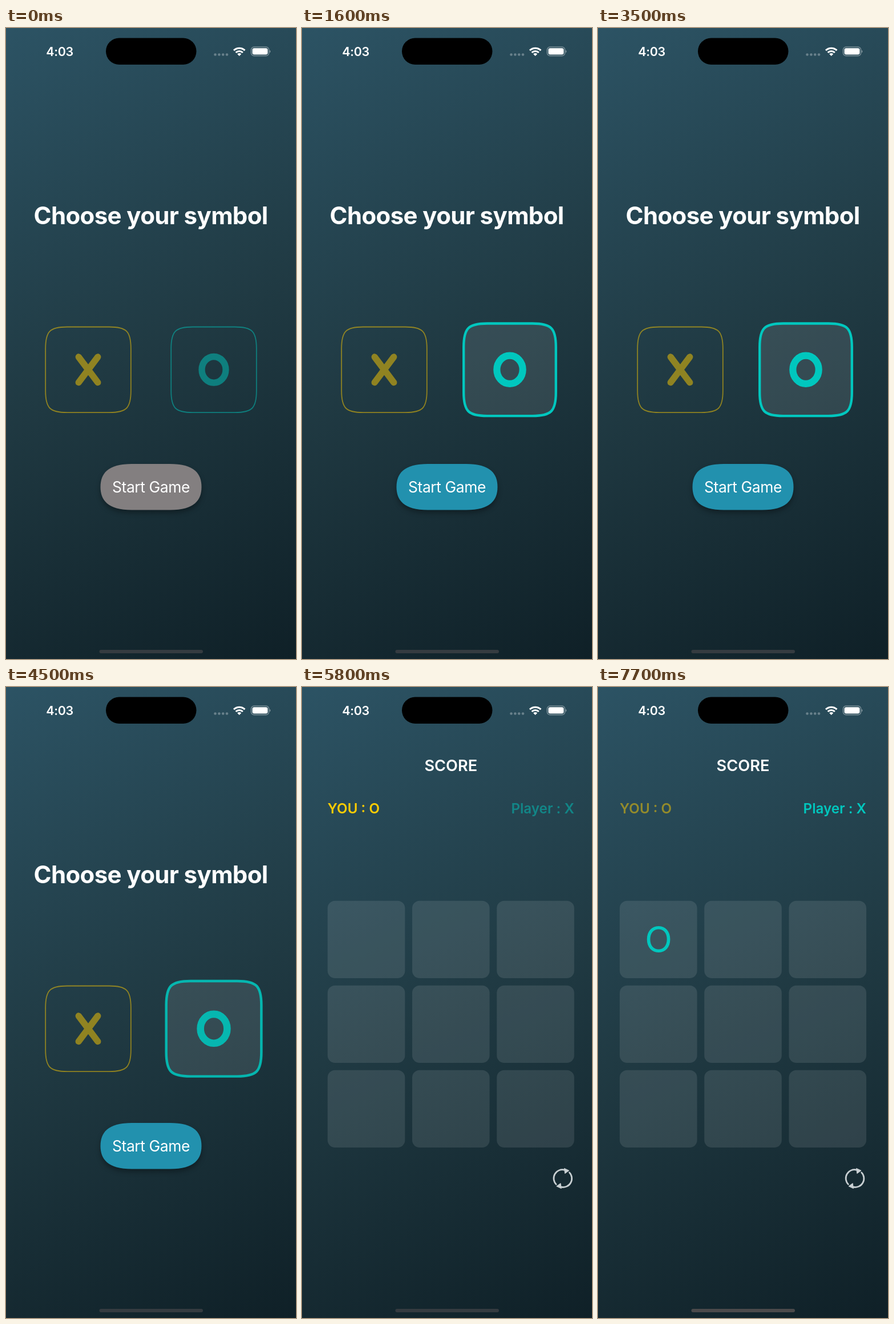
An HTML page that plays this animation: 508x1103 px, repeating every 8000 ms.

```html
<!DOCTYPE html>
<html lang="en">
<head>
<meta charset="utf-8">
<title>Choose your symbol</title>
<style>
  html, body { margin: 0; width: 100%; height: 100%; overflow: hidden; background: #203a43; }
  svg { display: block; width: 100%; height: 100%; }
  text { font-family: Inter, "Liberation Sans", sans-serif; fill: #fff; text-anchor: middle; }
  .title { font-size: 42px; font-weight: 700; letter-spacing: -.015em; }
  .clock { font-size: 21.5px; font-weight: 600; letter-spacing: -.02em; }
  .label { font-size: 26.4px; letter-spacing: -.015em; }
  .score { font-size: 27.2px; font-weight: 600; }
  .side { font-size: 24.2px; font-weight: 600; }
  .mark { font-size: 63px; }
  .side, .mark { text-anchor: start; }
  #x { color: #ffcc00; }
  #o { color: #00c7be; }
  .frame { fill: #fff; stroke: currentColor; }
  .glyph { fill: none; stroke: currentColor; stroke-width: 11.3; stroke-linecap: round; }
  #button { filter: drop-shadow(0 5px 4px rgba(0, 0, 0, .33)); }
</style>
</head>
<body>
<svg viewBox="0 0 508 1103" preserveAspectRatio="none">
  <defs>
    <linearGradient id="sky" gradientUnits="userSpaceOnUse" x1="0" y1="0" x2="508" y2="1103">
      <stop offset="0" stop-color="#2c5364"/>
      <stop offset=".5" stop-color="#203a43"/>
      <stop offset="1" stop-color="#0f2027"/>
    </linearGradient>
    <g id="arrow">
      <path d="M-11.6 10.4A15.2 15.2 0 0 1 3 -14.9" fill="none" stroke="#c9d0d3" stroke-width="2.7" stroke-linecap="round"/>
      <path d="M2.6 -17.6L11 -13.7L3.8 -8.6Z" fill="#c9d0d3" stroke="#c9d0d3" stroke-linejoin="round"/>
    </g>
  </defs>

  <g id="choose">
    <rect width="508" height="1103" fill="url(#sky)"/>
    <text class="title" x="253.5" y="343">Choose your symbol</text>
    <g id="x">
      <path class="frame"/>
      <path class="glyph" d="M-16.8 -22.3L16.8 22.3M16.8 -22.3L-16.8 22.3"/>
    </g>
    <g id="o">
      <path class="frame"/>
      <ellipse class="glyph" rx="21" ry="22.8"/>
    </g>
    <path id="button"/>
    <text id="start" class="label" x="254" y="812">Start Game</text>
  </g>

  <g id="game">
    <rect width="508" height="1103" fill="url(#sky)"/>
    <text class="score" x="254" y="147">SCORE</text>
    <text id="you" class="side" x="38" y="221" style="fill:#ffcc00">YOU : O</text>
    <text id="rival" class="side" x="470" y="221" style="fill:#00c7be;text-anchor:end">Player : X</text>
    <g id="grid" fill="#fff" fill-opacity=".1"></g>
    <text id="move" class="mark" x="106" y="464" style="fill:#00c7be;text-anchor:middle">O</text>
    <g transform="translate(450 859)">
      <use href="#arrow"/>
      <use href="#arrow" transform="rotate(180)"/>
    </g>
  </g>

  <g id="status">
    <text class="clock" x="94" y="49">4:03</text>
    <rect x="175" y="17.5" width="158.5" height="46.5" rx="23.2"/>
    <g fill="#fff" fill-opacity=".3">
      <circle cx="366.5" cy="46.5" r="2.3"/><circle cx="373.4" cy="46.5" r="2.3"/>
      <circle cx="380.2" cy="46.5" r="2.3"/><circle cx="387" cy="46.5" r="2.3"/>
    </g>
    <g fill="none" stroke="#fff" stroke-width="3.1">
      <path d="M399 39.2A13.8 13.8 0 0 1 418.4 39.2"/>
      <path d="M402.6 43A8.6 8.6 0 0 1 414.8 43"/>
    </g>
    <path d="M408.7 49L405.2 45.5A5 5 0 0 1 412.2 45.5Z" fill="#fff"/>
    <rect x="429.4" y="33.2" width="31.2" height="15.4" rx="5" fill="none" stroke="#fff" stroke-opacity=".45" stroke-width="1.2"/>
    <path d="M462 38.4Q464.6 40.9 462 43.4Z" fill="#fff" fill-opacity=".5"/>
    <rect x="431.5" y="35.3" width="27" height="11.2" rx="3.3" fill="#fff"/>
    <rect id="home" x="163.5" y="1087" width="181.5" height="6" rx="3"/>
  </g>
</svg>
<script>
  const LOOP = 8000, STEP = 100;
  const TAP_O = 500, TAP_X = 1700, TAP_O2 = 2650;
  const PRESS = 4200, START = 5150, PUSH = 5350, MOVE = 7150;

  const $ = id => document.getElementById(id);
  const clamp = v => Math.max(0, Math.min(1, v));
  const ramp = (t, from, length) => clamp((t - from) / length);
  const mix = (a, b, k) => a + (b - a) * k;

  // Smooth-cornered rectangle: corner spans ex, ey with handles cx, cy.
  function softRect(x, y, w, h, ex, ey, cx, cy) {
    const r = x + w, b = y + h;
    return `M${x + ex} ${y}H${r - ex}C${r - cx} ${y} ${r} ${y + cy} ${r} ${y + ey}` +
      `V${b - ey}C${r} ${b - cy} ${r - cx} ${b} ${r - ex} ${b}` +
      `H${x + ex}C${x + cx} ${b} ${x} ${b - cy} ${x} ${b - ey}` +
      `V${y + ey}C${x} ${y + cy} ${x + cx} ${y} ${x + ex} ${y}Z`;
  }

  // Lightly bouncing step from 0 to 1.
  function spring(ms) {
    if (ms <= 0) return 0;
    const s = ms / 1000, decay = 11, freq = 11.2;
    return 1 - Math.exp(-decay * s) * (Math.cos(freq * s) + decay / freq * Math.sin(freq * s));
  }

  // Remaining share of a critically damped slide.
  function slide(ms) {
    const k = 14 * Math.max(0, ms) / 1000;
    return (1 + k) * Math.exp(-k);
  }

  for (const frame of document.querySelectorAll(".frame"))
    frame.setAttribute("d", softRect(-74.8, -74.8, 149.6, 149.6, 38, 38, 7.6, 7.6));
  $("button").setAttribute("d", softRect(165.5, 762, 177, 80.5, 55, 40.2, 12.3, 17.3));

  for (let i = 0; i < 9; i++) {
    const cell = document.createElementNS("http://www.w3.org/2000/svg", "rect");
    const attrs = { x: 38 + 148.2 * (i % 3), y: 373.7 + 148 * Math.floor(i / 3), width: 135.6, height: 135.4, rx: 13 };
    for (const name in attrs) cell.setAttribute(name, attrs[name]);
    $("grid").append(cell);
  }

  function drawChoice(id, cx, chosen, press) {
    const g = $(id), frame = g.querySelector(".frame"), glyph = g.querySelector(".glyph");
    const alpha = clamp(mix(.5, 1, chosen)) - .12 * press;
    g.setAttribute("transform", `translate(${cx} 597.3) scale(${1 + .08 * chosen + .034 * press})`);
    frame.setAttribute("stroke-width", mix(1.8, 4, chosen));
    frame.setAttribute("fill-opacity", .1 * clamp(chosen));
    frame.setAttribute("stroke-opacity", alpha);
    // Group opacity keeps the crossing of the X even.
    glyph.setAttribute("opacity", alpha);
  }

  function draw(t) {
    const first = spring(t - TAP_O), swap = spring(t - TAP_X) - spring(t - TAP_O2);
    const press = Math.sin(Math.PI * ramp(t, PRESS, 600));
    drawChoice("x", 144, swap, 0);
    drawChoice("o", 364, first - swap, press);

    const ready = ramp(t, TAP_O - 50, 250);
    const tint = [[131, 34], [127, 145], [128, 174]].map(([a, b]) => Math.round(mix(a, b, ready)));
    $("button").setAttribute("fill", `rgb(${tint})`);
    $("start").setAttribute("opacity", 1 - .4 * ramp(t, START, 100));

    const offset = t < PUSH ? 520 : 508 * slide(t - PUSH);
    $("game").setAttribute("transform", `translate(${offset} 0)`);

    const turn = ramp(t, MOVE, 300);
    $("you").setAttribute("opacity", mix(1, .5, turn));
    $("rival").setAttribute("opacity", mix(.5, 1, turn));
    $("move").setAttribute("opacity", turn);
    $("home").setAttribute("fill", t < MOVE ? "#353b40" : "#4b4a4b");
  }

  function tick() {
    const t = performance.now() % LOOP;
    draw(Math.floor(t / STEP) * STEP);
    requestAnimationFrame(tick);
  }
  tick();
</script>
</body>
</html>
```
